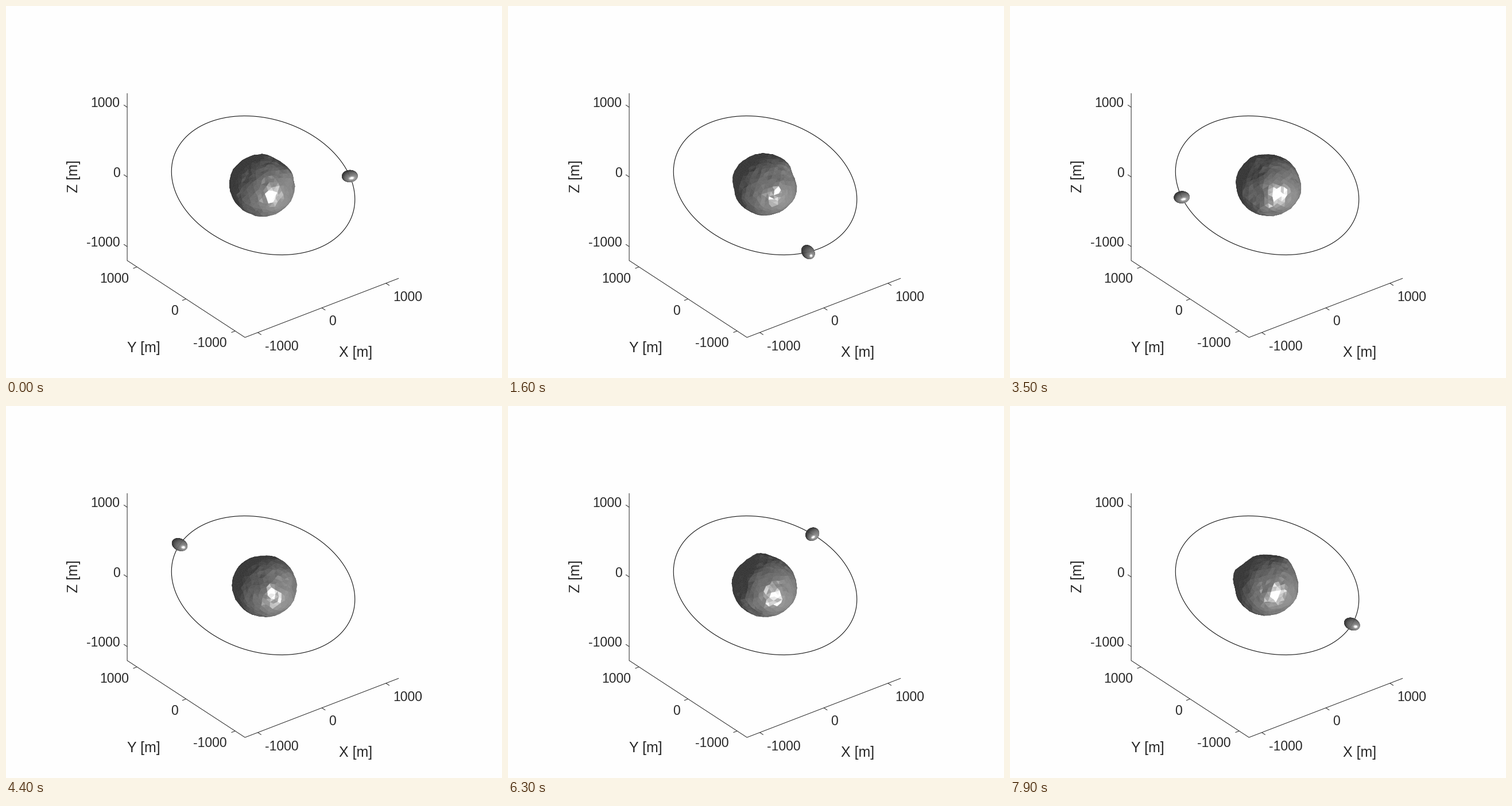
A matplotlib script that plays this animation: 864x648 px, repeating every 8000 ms.

```python
import numpy as np
import matplotlib.pyplot as plt
from matplotlib.animation import FuncAnimation
from matplotlib.collections import PolyCollection

W, H, DPI = 864, 648, 100
FRAMES, STEP = 80, 100
PX = 72 / DPI
INK = "#262626"
CENTRE = np.array([448.0, 312.5])

# Orbit frame in view space: x right, y down, z towards the viewer
RADIUS = 163.6
U = np.array([0.9765, 0.1479, -0.1571])
V = np.array([0.0, 0.7250, 0.6889])
N = np.array([0.2158, -0.6727, 0.7081])
U, V, N = (v / np.linalg.norm(v) for v in (U, V, N))

ORBIT_START, ORBIT_RATE = -19.2, 5.082
SPIN_RATE = 26.8

LIGHT = np.array([0.609, 0.396, 0.687])
AMBIENT, DIFFUSE, SPECULAR, SHINE = 0.22, 0.35, 0.9, 12

# longitude, latitude, height, width
BUMPS = [
    (241, -2, 0.05, 0.30), (355, 43, 0.09, 0.28), (223, -18, -0.06, 0.25),
    (266, 21, -0.08, 0.35), (308, 50, -0.04, 0.35), (258, 45, 0.05, 0.30),
    (106, -15, -0.05, 0.28), (150, 40, -0.045, 0.22),
]


def icosphere(levels):
    g = (1 + 5 ** 0.5) / 2
    verts = []
    for a in (-1, 1):
        for b in (-g, g):
            verts += [(0, a, b), (a, b, 0), (b, 0, a)]
    verts = [np.array(v) / np.hypot(1, g) for v in verts]
    edge = 2 / np.hypot(1, g)

    def near(i, j):
        return abs(np.linalg.norm(verts[i] - verts[j]) - edge) < 1e-6

    faces = [(i, j, k) for i in range(12) for j in range(i) for k in range(j)
             if near(i, j) and near(j, k) and near(i, k)]
    for _ in range(levels):
        mids = {}

        def mid(i, j):
            key = (min(i, j), max(i, j))
            if key not in mids:
                m = verts[i] + verts[j]
                mids[key] = len(verts)
                verts.append(m / np.linalg.norm(m))
            return mids[key]

        split = []
        for i, j, k in faces:
            a, b, c = mid(i, j), mid(j, k), mid(k, i)
            split += [(i, a, c), (j, b, a), (k, c, b), (a, b, c)]
        faces = split
    return np.array(verts), np.array(faces)


def asteroid(verts):
    rng = np.random.default_rng(5)
    jitter = verts + rng.normal(0, 0.018, verts.shape)
    d = jitter / np.linalg.norm(jitter, axis=1, keepdims=True)
    lat = np.arcsin(d[:, 2])
    r = 1 / np.sqrt((np.cos(lat) / 56) ** 2 + (np.sin(lat) / 51) ** 2)
    r += 1.5 * np.exp(-(lat / 0.16) ** 2)
    for lon, la, height, width in BUMPS:
        lon, la = np.radians([lon, la])
        c = np.array([np.cos(la) * np.cos(lon), np.cos(la) * np.sin(lon), np.sin(la)])
        angle = np.arccos(np.clip(d @ c, -1, 1))
        r *= 1 + height * np.exp(-(angle / width) ** 2)
    r *= 1 + rng.normal(0, 0.006, len(r))
    return d * r[:, None]


def place(verts, angle):
    """Turn body coordinates about the orbit normal into view space."""
    c, s = np.cos(angle), np.sin(angle)
    return verts @ np.array([c * U + s * V, c * V - s * U, N])


def shade(points, faces):
    """Visible triangles, back to front, with their grey levels."""
    tri = points[faces]
    n = np.cross(tri[:, 1] - tri[:, 0], tri[:, 2] - tri[:, 0])
    mid = tri.mean(axis=1)
    n *= np.sign((n * mid).sum(axis=1))[:, None]
    n /= np.linalg.norm(n, axis=1, keepdims=True)
    order = np.argsort(mid[:, 2])
    order = order[n[order, 2] > 0]
    tri, n = tri[order], n[order]
    lit = n @ LIGHT
    mirror = np.clip(2 * lit * n[:, 2] - LIGHT[2], 0, 1)
    grey = AMBIENT + DIFFUSE * np.clip(lit, 0, 1)
    grey += np.where(lit > 0, SPECULAR * mirror ** SHINE, 0)
    return tri[:, :, :2], np.clip(grey, 0, 1)


def show(coll, points, faces, centre):
    tri, grey = shade(points, faces)
    rgb = np.repeat(grey[:, None], 3, axis=1)
    coll.set_verts(tri + centre)
    coll.set_facecolor(rgb)
    coll.set_edgecolor(rgb)


def orbit(angle):
    return RADIUS * (np.cos(angle)[..., None] * U + np.sin(angle)[..., None] * V)[..., :2]


fig = plt.figure(figsize=(W / DPI, H / DPI), dpi=DPI, facecolor="#fefefe")
ax = fig.add_axes([0, 0, 1, 1])
ax.set_xlim(0, W)
ax.set_ylim(H, 0)
ax.axis("off")


def line(points, color=INK, width=1.0):
    x, y = np.transpose(points)
    ax.plot(x, y, color=color, lw=width * PX, solid_capstyle="butt")


def label(x, y, text, size=22.9, **kw):
    ax.text(x, y, text, fontsize=size * PX, family="Liberation Sans", color=INK, **kw)


# Plot box, in pixels per 1000 m along each axis
EX, EY, EZ = np.array([[111.6, -42.9], [-85.5, -55.8], [0, -121.4]])
corner = np.array([416.3, 577.3])
left = corner + 2.4 * EY
line([corner + 2.4 * EX, corner, left, left + 2.4 * EZ])
for base, axis, out in ((corner, EX, -EY), (corner, EY, -EX), (left, EZ, EY)):
    for v in (-1, 0, 1):
        p = base + (v + 1.2) * axis
        line([p, p + 7.2 * out / np.linalg.norm(out)])

for text, y in (("1000", 176), ("0", 298), ("-1000", 419)):
    label(198.5, y, text, ha="right")
for text, x, y in (("1000", 214.5, 482), ("0", 299.5, 537.5), ("-1000", 385, 594.5)):
    label(x, y, text, ha="right")
for text, x, y in (("-1000", 451.5, 599.5), ("0", 562, 556), ("1000", 674, 514)):
    label(x, y, text)
label(579.5, 611, "X [m]", 25)
label(211, 603.5, "Y [m]", 25)
label(118.3, 297, "Z [m]", 25, rotation=90, ha="center", va="center")

line(CENTRE + orbit(np.linspace(0, 2 * np.pi, 241)), "#111111", 1.1)

sphere, faces = icosphere(3)
rock = asteroid(sphere)
moon = sphere * np.sqrt([200, 120, 92])
rock_art = PolyCollection([], linewidths=0.4, zorder=3)
moon_art = PolyCollection([], linewidths=0.2, zorder=4)
ax.add_collection(rock_art)
ax.add_collection(moon_art)


def update(i):
    angle = np.radians(ORBIT_START + ORBIT_RATE * i)
    pos = orbit(angle)
    show(rock_art, place(rock, np.radians(SPIN_RATE * i)), faces, CENTRE - 0.015 * pos)
    show(moon_art, place(moon, angle), faces, CENTRE + pos)
    return rock_art, moon_art


anim = FuncAnimation(fig, update, frames=FRAMES, interval=STEP, repeat=True,
                     repeat_delay=0, blit=False)
plt.show()
```
